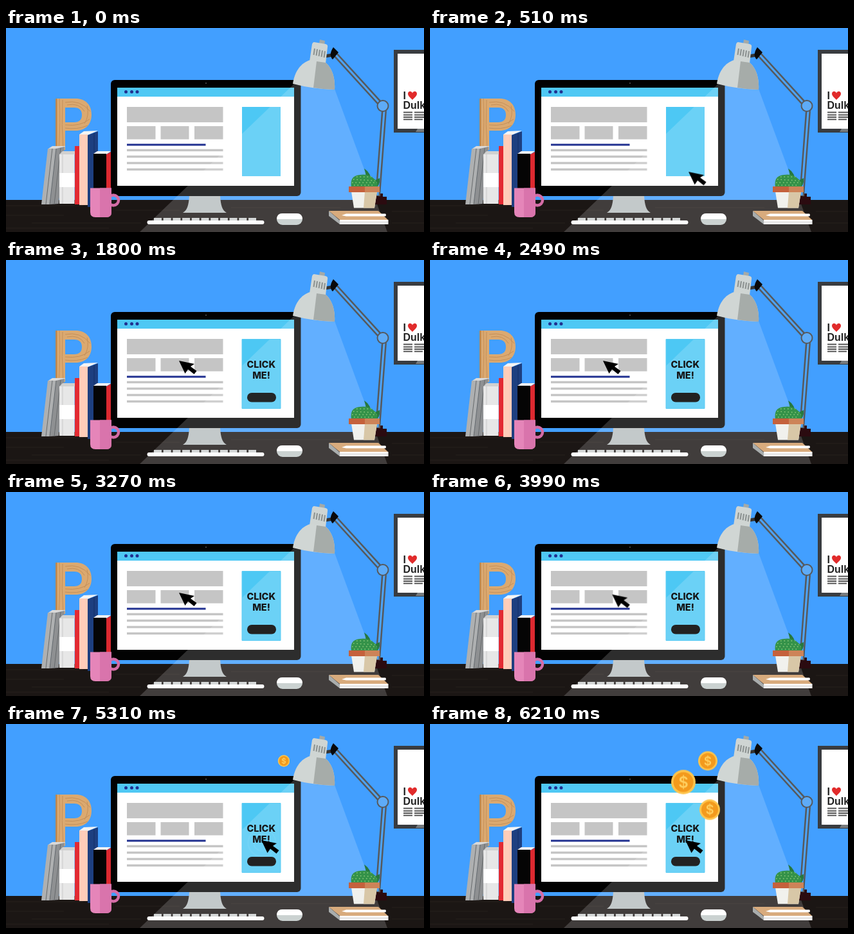
An HTML page without scripts that plays this animation: 650x318 px, repeating every 6240 ms.

```html
<!DOCTYPE html>
<html lang="en">
<head>
<meta charset="utf-8">
<title>Desk with a banner click</title>
<style>
html, body { margin: 0; width: 100%; height: 100%; overflow: hidden; background: #429fff; }
svg { display: block; width: 650px; height: 318px; }
.cursor { animation: travel 6.24s infinite; }
.ad { animation: reveal 6.24s infinite; }
.ring, .coin { transform-box: fill-box; transform-origin: center; }
.ring { animation: ripple 6.24s infinite; }
.coin { animation: 6.24s infinite; }
.first { animation-name: pop1; }
.second { animation-name: pop2; }
.third { animation-name: pop3; }
@keyframes travel {
  0% { transform: translate(475px, 261px); animation-timing-function: ease-in-out; }
  19.8%, 60% { transform: translate(269px, 157px); animation-timing-function: ease-in-out; }
  77%, 100% { transform: translate(397px, 181px); }
}
@keyframes reveal {
  0%, 22.4% { opacity: 0; }
  30.4%, 100% { opacity: 1; }
}
@keyframes ripple {
  0%, 79.8% { transform: scale(0); opacity: .6; }
  88.5%, 100% { transform: scale(1.2); opacity: 0; }
}
@keyframes pop1 {
  0%, 83.3% { transform: scale(0); animation-timing-function: ease-out; }
  87.5%, 100% { transform: scale(1); }
}
@keyframes pop2 {
  0%, 85.4% { transform: scale(0); animation-timing-function: ease-out; }
  90%, 100% { transform: scale(1); }
}
@keyframes pop3 {
  0%, 87.5% { transform: scale(0); animation-timing-function: ease-out; }
  93%, 100% { transform: scale(1); }
}
</style>
</head>
<body>
<svg viewBox="0 0 650 318">
  <defs>
    <clipPath id="screen"><path d="M173 93H448V246H173z"/></clipPath>
    <clipPath id="letter"><path id="p" fill-rule="evenodd" clip-rule="evenodd" d="M77 110H108C124 110 133 120 133 135S124 160 108 160H92V190H77zM92 124V147H106C114 147 118 143 118 135.500S114 124 106 124z"/></clipPath>
    <g id="coin">
      <circle r="19" fill="#ffc54d"/>
      <circle r="15.500" fill="#f39a1d"/>
      <text y="8.500" font-family="Inter, sans-serif" font-size="24" font-weight="600" text-anchor="middle" fill="#ffd060">$</text>
    </g>
  </defs>

  <path fill="#429fff" d="M0 0H650V318H0z"/>
  <path fill="#1b1614" d="M0 268H650V318H0z"/>
  <g fill="none" stroke="#26201d" stroke-width="1">
    <path d="M0 277H120M170 284H270M0 292H90M40 304H210M350 280H520M0 312H160M600 286H650M600 304H650"/>
  </g>

  <!-- poster -->
  <path fill="#393c40" d="M603 34H650V163H603z"/>
  <path fill="#fff" d="M609 40H650V157H609z"/>
  <path fill="#777b7e" d="M640 157H650V162H637z"/>
  <g font-family="Liberation Sans, Arial, sans-serif" font-size="16" font-weight="700" fill="#222">
    <text x="617.500" y="110.500">I</text>
    <text x="617.500" y="126">Dulk</text>
  </g>
  <path fill="#e12b2b" d="M632 112C628 108 625 105.500 625 102.500C625 98 630.500 97.500 632 101.500C633.500 97.500 639 98 639 102.500C639 105.500 636 108 632 112z"/>
  <path stroke="#555" stroke-width="2" d="M618 131.500H632M635 131.500H650M618 135.500H632M635 135.500H650M618 139H632M635 139H650M618 142.500H632M635 142.500H648"/>

  <!-- wooden letter -->
  <use href="#p" fill="#dba970"/>
  <g clip-path="url(#letter)" fill="none" stroke="#c48f58" stroke-width="1">
    <path stroke="#b98650" stroke-width="3" d="M78 110V190"/>
    <path d="M83 110Q85 145 82 190M88 112Q86 150 89 190M92 116Q115 111 131 130M95 120Q114 116 122 130M92 151Q116 154 130 142M92 156Q110 159 127 152M126 121Q130 137 122 149"/>
  </g>

  <!-- books -->
  <path fill="#d9d9d9" d="M66 188L72 184H92L90 189z"/>
  <path fill="#aeb0b1" d="M65 188H78L68 275H55z"/>
  <path fill="#8e9092" d="M78 188L91 185L82 274L68 275z"/>
  <path stroke="#66696b" fill="none" d="M72 188L62 275M78 188L68 275M85 187L75 275"/>
  <path fill="#d0d0d0" d="M83 197L88 192H107V197z"/>
  <path fill="#e7e7e7" d="M83 197H106.500V274H83z"/>
  <path fill="#fff" d="M83 226H106.500V248H83z"/>
  <path stroke="#c9c9c9" d="M88 197V226M88 248V274"/>
  <path fill="#e32a32" d="M107 184H114V275H107z"/>
  <path fill="#f4f4f4" d="M114 166L121 161L143 160L127 167z"/>
  <path fill="#ffcdb9" d="M114 166H127V276H114z"/>
  <path fill="#1d3f80" d="M127 167L143 161V279H127z"/>
  <path stroke="#143066" d="M137 164V279"/>
  <path fill="#f4f4f4" d="M136 196L142 192H163L156 197z"/>
  <path fill="#050505" d="M136 196H156V262H136z"/>
  <path fill="#dc2930" d="M156 197L163 193V262H156z"/>

  <!-- monitor -->
  <rect x="163" y="81" width="295.500" height="181" rx="6" fill="#020202"/>
  <circle cx="311" cy="86" r="1" fill="#555"/>
  <path fill="#fff" d="M173 93H448V246H173z"/>
  <path fill="#4fc8f4" d="M173 93H448V107H173z"/>
  <g fill="#203090">
    <circle cx="186.500" cy="99.500" r="2.500"/><circle cx="195.500" cy="99.500" r="2.500"/><circle cx="204" cy="99.500" r="2.500"/>
    <path d="M188 180.500H310.500V183.500H188z"/>
  </g>
  <path fill="#c5c5c5" d="M188 123H337.500V147H188zM188 153H232.500V173.500H188zM240.500 153H284.500V173.500H240.500zM293 153H337.500V173.500H293z"/>
  <path stroke="#c5c5c5" stroke-width="3.500" d="M188 190.500H337.500M188 200.500H337.500M188 210.500H337.500M188 220.500H337.500"/>
  <path fill="#4dc8f4" d="M367 123H427V231H367z"/>

  <!-- light -->
  <path fill="#fff" opacity=".17" d="M447 88L511 95L593 318H208z"/>

  <!-- desk things -->
  <path fill="#c3c9ca" d="M285 262H333C334 276 336 284 343 288H275C282 284 284 276 285 262z"/>
  <path stroke="#d5d8d8" stroke-width="4" stroke-dasharray="12 2.700" d="M230 298H391"/>
  <rect x="219.500" y="300" width="182" height="6" rx="3" fill="#fff"/>
  <rect x="421" y="289" width="40" height="18" rx="9" fill="#cbd2d1"/>
  <path fill="#fff" d="M430 289H452Q461 289 461 298H421Q421 289 430 289z"/>
  <circle cx="167" cy="268.500" r="8" fill="none" stroke="#d46ca6" stroke-width="4.500"/>
  <path fill="#e585b9" d="M131 249.500H164V287Q164 295 156 295H139Q131 295 131 287z"/>
  <path fill="#d974ac" d="M146 249.500H164V287Q164 295 156 295H146z"/>
  <path fill="#a9adad" d="M502 285L519 300V306L502 293z"/>
  <path fill="#d8ab7d" d="M502 285H579L594 299H519z"/>
  <path fill="#fff" d="M519 299H594.500V306H519z"/>
  <path stroke="#c8c8c8" d="M519 302.500H594"/>
  <path fill="#fff" d="M522 292L529 289.500H590Q592 291.500 590 293.500H529z"/>

  <!-- lamp -->
  <path fill="#2b0b10" d="M573 258H586V263H592V275H573z"/>
  <g fill="none">
    <path stroke="#56595c" stroke-width="8" d="M510 39L581 117M588 129L578 262"/>
    <path stroke="#4da4fb" stroke-width="3" d="M511 40L580 116M588 130L578 261"/>
  </g>
  <circle cx="586" cy="121.500" r="8.500" fill="#5eabf7" stroke="#56595c" stroke-width="2"/>
  <path stroke="#333" stroke-width="5" d="M496 44L508 42"/>
  <path fill="#090909" d="M509 30L517 38L508 49Q501 42 509 30z"/>
  <path fill="#a4aaa8" d="M488 18L496 20L495 27L487 25z"/>
  <path fill="#cfd5d3" d="M479 22L497 25Q501 26 500 30L497 55L472 52L476 25Q477 22 479 22z"/>
  <path stroke="#8b9190" stroke-width="2" d="M480 32L478.500 42M484 33L482.500 43M488 34L486.500 44M492 35L490.500 45M496 36L494.500 46"/>
  <path fill="#d0d6d4" d="M446 87C449 67 459 54 473 50L497 54C508 63 512 80 511 96Q477 95 446 87z"/>
  <path fill="#a6aca9" d="M483 52L497 54C508 63 512 80 511 96Q493 95.500 478 93z"/>

  <!-- cactus -->
  <path fill="#27783f" d="M557 219Q568 226 568 240L581 234Q582 246 574 250H556Q563 235 557 219z"/>
  <path fill="#349249" d="M537 248Q534 231 549 229Q563 227 570 233Q580 240 577 248z"/>
  <path fill="none" stroke="#8fcb7c" stroke-width="1.500" stroke-dasharray="1.500 4" d="M540 236L574 238M538 241H577M545 232H568M541 245H574"/>
  <path fill="#f1f1ed" d="M537 255H577L573 280.500H541z"/>
  <path fill="#d8c7a7" d="M558 255H577L573 280.500H556z"/>
  <path fill="#c5613c" d="M533 247H581V256H533z"/>
  <path fill="#cd8358" d="M558 247H581V256H558z"/>

  <!-- advert -->
  <g class="ad" fill="#151515">
    <path fill="none" stroke="#5bcbf3" d="M367 123.500H427V231.500H367z"/>
    <g font-family="Inter, sans-serif" font-size="14.500" font-weight="800" text-anchor="middle">
      <text x="396.800" y="168">CLICK</text>
      <text x="397" y="185">ME!</text>
    </g>
    <rect x="375" y="207" width="45" height="14.500" rx="7" fill="#222"/>
  </g>
  <g class="ring" fill="none" stroke="#fff" stroke-width="2">
    <circle cx="398" cy="185" r="20"/><circle cx="398" cy="185" r="12"/>
  </g>
  <g clip-path="url(#screen)">
    <path class="cursor" d="M0 0L24 5L18 9L27.500 16L23.500 21L14 13.500L9.500 20z"/>
  </g>

  <!-- coins -->
  <g transform="translate(432 57.500) scale(.79)"><use class="coin first" href="#coin"/></g>
  <g transform="translate(394 90.500)"><use class="coin second" href="#coin"/></g>
  <g transform="translate(435 133.500) scale(.84)"><use class="coin third" href="#coin"/></g>
</svg>
</body>
</html>
```
